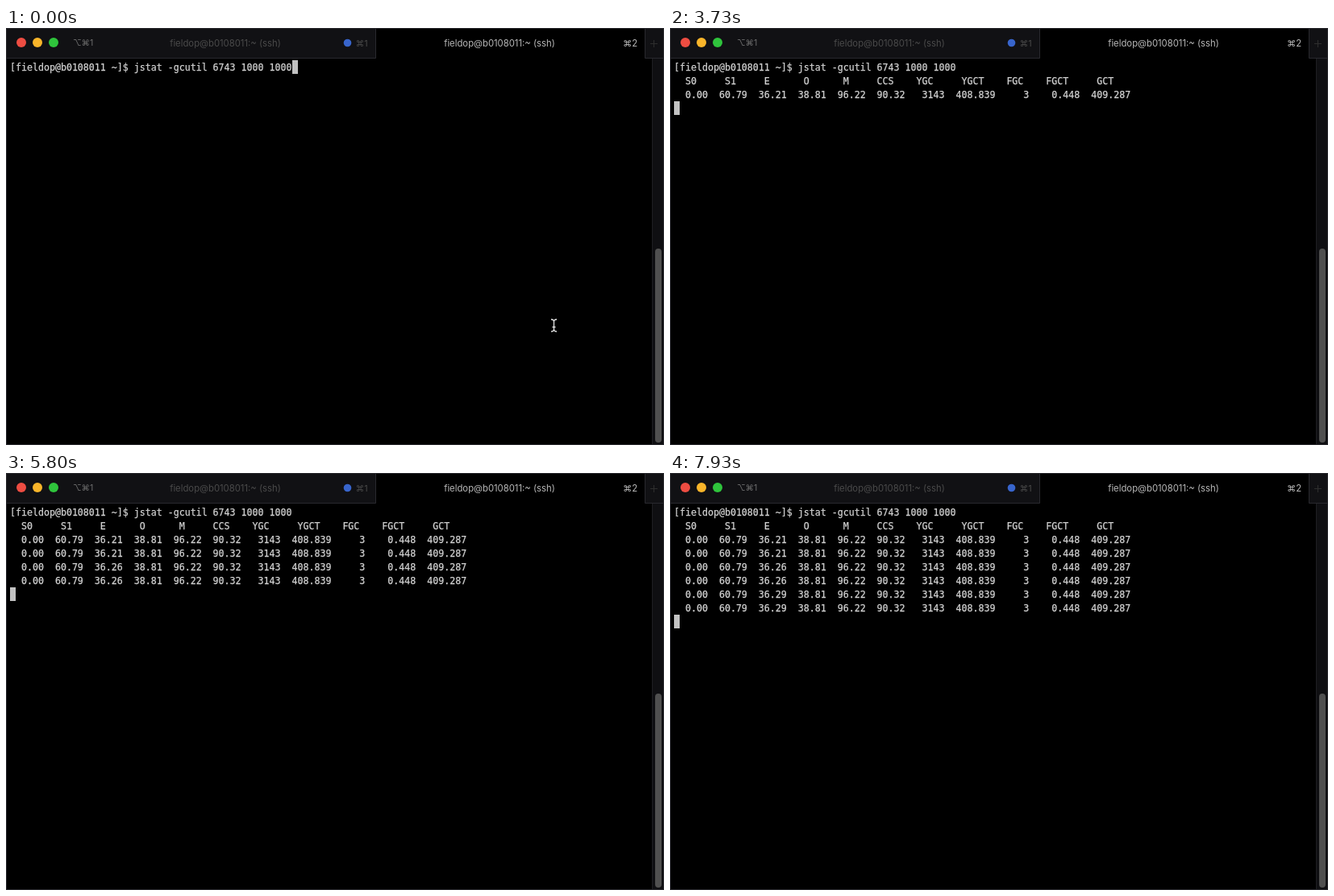
Recreate the animation shown at these times as an HTML page. Size 816 px wide and 518 px high, loop 8 s.

```html
<!DOCTYPE html>
<html lang="en">
<head>
<meta charset="utf-8">
<title>Terminal</title>
<style>
  html, body { margin: 0; width: 100%; height: 100%; overflow: hidden; background: #000; }
  svg { display: block; width: 816px; height: 518px; }
  text { white-space: pre; }
  .mono { font: 11.628px "DejaVu Sans Mono", monospace; fill: #d2d2d2; stroke: #d2d2d2; stroke-width: .25px; }
  .ui { font: 11.3px Inter, "DejaVu Sans", sans-serif; }
  .mid { text-anchor: middle; }
  .dim { fill: #4a4a4a; }
  .lit { fill: #b8b8b8; }
  .bar { fill: #111114; }
  .edge { fill: none; stroke: #29292e; }
</style>
</head>
<body>
<svg viewBox="0 0 816 518">
  <rect width="816" height="518"/>

  <!-- tab bar -->
  <rect class="bar" width="459" height="38"/>
  <rect class="bar" x="792" width="24" height="38"/>
  <path class="edge" d="M0 37.5H458.5V0M816 37.5H792.5V0"/>
  <circle cx="19" cy="18" r="6" fill="#ee4d42"/>
  <circle cx="39" cy="18" r="6" fill="#f9b52a"/>
  <circle cx="59" cy="18" r="6" fill="#2fc43c"/>
  <text class="ui" x="83" y="22" fill="#707070" style="font-size:10.4px">⌥⌘1</text>
  <text class="ui mid dim" x="272" y="23">fieldop@b0108011:~ (ssh)</text>
  <circle cx="423.5" cy="18.5" r="4.8" fill="#3865cc"/>
  <text class="ui dim" x="433.5" y="23" style="font-size:10.8px">⌘1</text>
  <text class="ui mid lit" x="612" y="23">fieldop@b0108011:~ (ssh)</text>
  <text class="ui lit" x="765" y="23">⌘2</text>
  <path d="M799 19.5H808M803.5 15V24" stroke="#2e2e2e"/>

  <!-- scroll bar -->
  <rect x="801" y="38" width="15" height="480" fill="#0f0f12"/>
  <path class="edge" d="M801.5 38V518" opacity=".6"/>
  <rect x="805" y="274" width="8" height="241" rx="4" fill="#505050"/>

  <rect class="edge" x=".5" y=".5" width="815" height="517"/>

  <g id="screen"></g>
  <rect id="cursor" width="7" height="17" fill="#c2c2c2"/>
  <path id="pointer" fill="none" stroke="#e4e4e4" stroke-width="1.3"
    d="M676 362Q679.5 362 679.5 365V374Q679.5 377 676 377M683 362Q679.5 362 679.5 365M679.5 374Q679.5 377 683 377M677.5 371.5H681.5"/>
</svg>
<script>
  const LOOP = 8000, ENTER = 2070, FIRST_ROW = 2800, INTERVAL = 1000;
  const LEFT = 5, TOP = 40, CELL = 7, LINE = 17;

  const prompt = '[fieldop@b0108011 ~]$ jstat -gcutil 6743 1000 1000';
  const header = '  S0     S1     E      O      M     CCS    YGC     YGCT    FGC    FGCT     GCT';
  const row = eden =>
    `  0.00  60.79  ${eden}  38.81  96.22  90.32   3143  408.839     3    0.448  409.287`;
  const rows = ['36.21', '36.21', '36.26', '36.26', '36.29', '36.29'].map(row);

  const byId = id => document.getElementById(id);
  const screen = byId('screen'), cursor = byId('cursor'), pointer = byId('pointer');

  const lines = [prompt, header, ...rows].map((content, i) => {
    const text = document.createElementNS('http://www.w3.org/2000/svg', 'text');
    text.setAttribute('class', 'mono');
    text.setAttribute('x', LEFT);
    text.setAttribute('y', TOP + 13 + i * LINE);
    text.textContent = content;
    return screen.appendChild(text);
  });

  function lineCount(t) {
    if (t < FIRST_ROW) return 1;
    return Math.min(lines.length, 3 + Math.floor((t - FIRST_ROW) / INTERVAL));
  }

  const show = (el, on) => el.setAttribute('visibility', on ? 'visible' : 'hidden');

  function render(t) {
    const count = lineCount(t), entered = t >= ENTER;
    lines.forEach((line, i) => show(line, i < count));
    show(pointer, !entered);
    cursor.setAttribute('x', LEFT + (entered ? 0 : prompt.length * CELL));
    cursor.setAttribute('y', TOP + (entered ? count : 0) * LINE);
  }

  function tick() {
    render(performance.now() % LOOP);
    requestAnimationFrame(tick);
  }
  tick();
</script>
</body>
</html>
```
